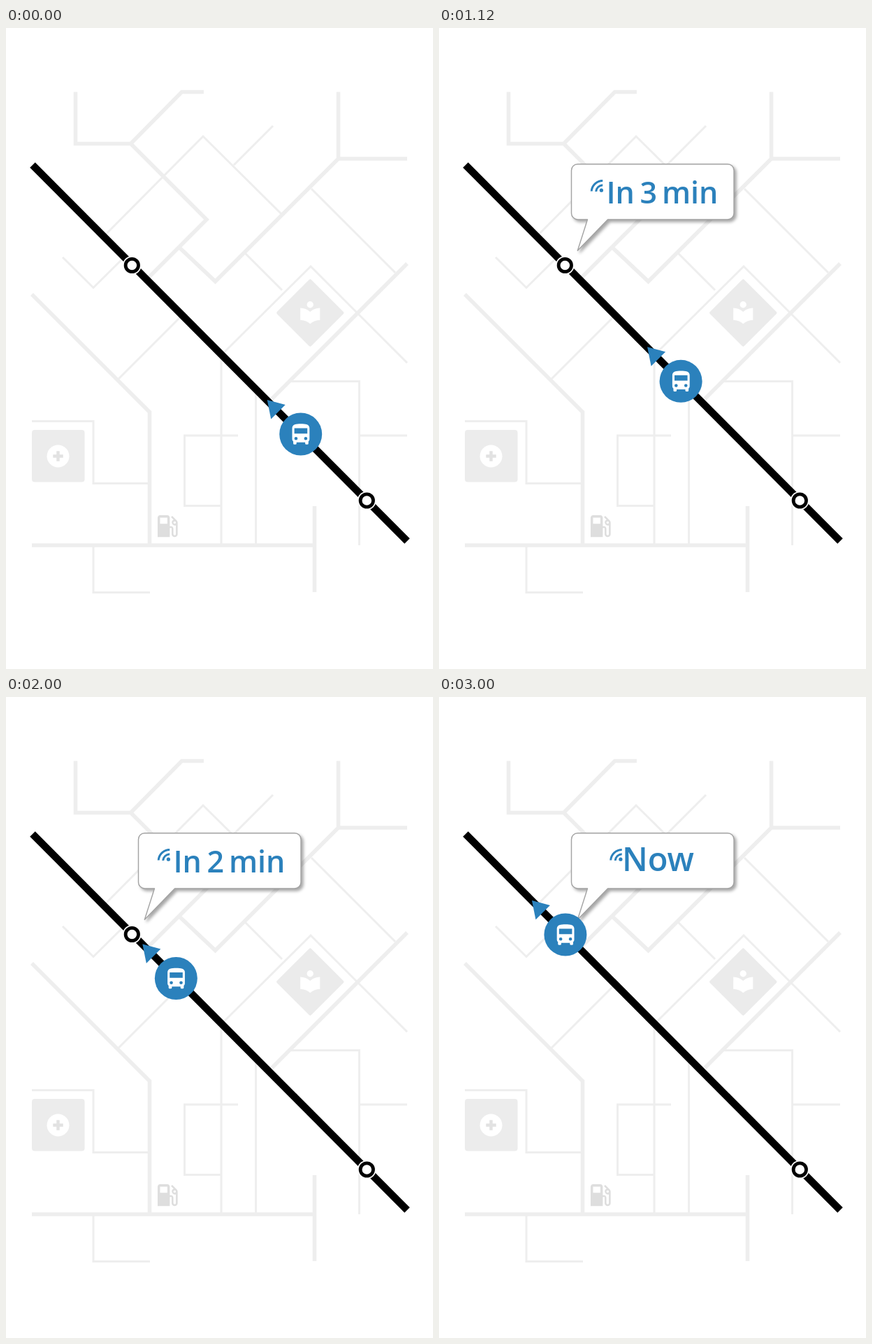
Animation of 611x917 px, one loop 4 s. Source, as an HTML page:

```html
<!DOCTYPE html>
<html lang="en">
<head>
<meta charset="utf-8">
<title>Bus arrival</title>
<style>
  html, body { margin: 0; width: 100%; height: 100%; overflow: hidden; background: #fff; }
  svg { display: block; width: 100%; height: 100%; }
  .road { fill: none; stroke: #eee; stroke-width: 3; }
  .main { stroke-width: 5.6; }
  .accent { fill: #2b81bc; }
  .balloon { fill: #fff; stroke: #a3a3a3; stroke-width: 1.4; stroke-linejoin: round;
             filter: drop-shadow(3px 3px 2px rgba(0, 0, 0, .35)); }
  text { font: 600 43px "Open Sans", "Noto Sans", sans-serif; }
  #now text { font-size: 47px; }
</style>
</head>
<body>
<svg viewBox="0 0 611 917">
  <defs>
    <g id="stop">
      <circle r="13.3" fill="#fff"/>
      <circle r="9.2" fill="#fff" stroke="#000" stroke-width="4.8"/>
    </g>
    <g id="signal" class="accent">
      <circle cx="232.4" cy="232.2" r="2.6"/>
      <path d="M218.2 233.5A16 16 0 0 1 234.2 218.5M224.7 234A10 10 0 0 1 234.2 224.7"
            fill="none" stroke="#2b81bc" stroke-width="3"/>
    </g>
  </defs>

  <path class="road" d="M140 298L282 155L394 266M326 196L382 140M81 328L125 371.5L169 328
    M437 230L557 350M342 322L395 375M308 468L436 341L574 479M161 502L252 411
    M308 466V740M357.5 518V740M406 505.5H505.5V740M505.5 583H574M332 583H255.5V683.5H308
    M37 562.5H125V651.5H205M125 740V807.5H206"/>
  <path class="road main" d="M99.5 91.5V165.5H178.5L251.5 91.5H283M178.5 165.5L287 274L202 359
    M248 314L299.5 362.5L475.5 187H574M475.5 91.5V187M37 381L205.5 549.5V740
    M37 740H441.5M441.5 684V807M574 337L380 531"/>

  <rect x="37" y="575" width="75.5" height="74.5" rx="4" fill="#ececec"/>
  <circle cx="74.5" cy="612.5" r="16" fill="#fff"/>
  <path d="M67.3 612.5h14.4M74.5 605.3v14.4" stroke="#e2e2e2" stroke-width="4.4"/>

  <rect x="-34.6" y="-34.6" width="69.2" height="69.2" rx="2" fill="#ebebeb"
        transform="translate(435.3 407.5) rotate(45)"/>
  <path fill="#fff" transform="translate(416.5 388) scale(1.56)"
    d="M12 11.55C9.64 9.35 6.48 8 3 8v11c3.48 0 6.64 1.35 9 3.55 2.36-2.19 5.52-3.55 9-3.55V8c-3.48 0-6.64 1.35-9 3.55z
    M12 8a3 3 0 0 0 0-6a3 3 0 0 0 0 6z"/>
  <path fill="#dedede" transform="translate(210 691.8) scale(1.74)"
    d="M19.77 7.23l-3.71-3.73L15 4.56l2.11 2.11A2.5 2.5 0 0 0 19 11.29v7.21a1 1 0 0 1-2 0V14c0-1.1-.9-2-2-2h-1V5
    c0-1.1-.9-2-2-2H6c-1.1 0-2 .9-2 2v16h10v-7.5h1.5v5a2.5 2.5 0 0 0 5 0V9c0-.69-.28-1.32-.73-1.77z
    M12 10H6V5h6zM18 10a1 1 0 0 1 0-2a1 1 0 0 1 0 2z"/>

  <path d="M38 196L574 734" stroke="#000" stroke-width="10.5"/>
  <use href="#stop" x="180.3" y="339.5"/>
  <use href="#stop" x="516.3" y="676"/>

  <g id="bubble">
    <path class="balloon" d="M198.5 194.7H413a9 9 0 0 1 9 9V265a9 9 0 0 1-9 9H241.5L198.3 318.5L212.5 274H198.5
      a9 9 0 0 1-9-9V203.7a9 9 0 0 1 9-9z"/>
    <g id="wait" class="accent">
      <use href="#signal"/>
      <text x="239.5" y="251">In</text>
      <text id="minutes" y="251">3</text>
      <text x="319" y="251">min</text>
    </g>
    <g id="now" class="accent">
      <use href="#signal" x="27.5"/>
      <text x="262" y="249">Now</text>
    </g>
  </g>

  <g id="bus">
    <path class="accent" d="M-48-49L-22-42L-42.5-21.5z"/>
    <circle class="accent" r="30.5"/>
    <path fill="#fff" transform="translate(-18.4 -17.8) scale(1.55)"
      d="M4 16c0 .88.39 1.67 1 2.22V20a1 1 0 0 0 1 1h1a1 1 0 0 0 1-1v-1h8v1a1 1 0 0 0 1 1h1a1 1 0 0 0 1-1v-1.78
      c.61-.55 1-1.34 1-2.22V6c0-3.5-3.58-4-8-4s-8 .5-8 4z
      M7.5 17a1.5 1.5 0 0 1 0-3a1.5 1.5 0 0 1 0 3zM16.5 17a1.5 1.5 0 0 1 0-3a1.5 1.5 0 0 1 0 3zM18 11H6V6h12z"/>
  </g>
</svg>
<script>
  const LOOP = 4000, STEP = 40, TRIP = 3000;
  const POP = 320, SETTLED = 600, PEAK = 1.095;
  const TWO = 1240, ONE = 2160, ARRIVED = 2720;
  const [bubble, wait, minutes, now, bus] =
    ["bubble", "wait", "minutes", "now", "bus"].map(id => document.getElementById(id));

  // Smoothstep progress of t between two times.
  function ease(t, from, to) {
    const p = Math.min(1, Math.max(0, (t - from) / (to - from)));
    return p * p * (3 - 2 * p);
  }

  const show = (node, visible) => node.setAttribute("visibility", visible ? "inherit" : "hidden");

  function draw(t) {
    const trip = ease(t, 0, TRIP);
    bus.setAttribute("transform", `translate(${421.7 - 240.8 * trip} ${581 - 241 * trip})`);

    // The bubble grows from the tip of its tail.
    const scale = PEAK * ease(t, 0, POP) - (PEAK - 1) * ease(t, POP, SETTLED);
    bubble.setAttribute("transform", `translate(198 319) scale(${scale}) translate(-198 -319)`);
    show(bubble, scale > 0);

    const left = t < TWO ? 3 : t < ONE ? 2 : 1;
    minutes.textContent = left;
    minutes.setAttribute("x", left === 1 ? 292.5 : 287.5);
    show(wait, t < ARRIVED);
    show(now, t >= ARRIVED);
  }

  function tick() {
    draw(Math.floor(performance.now() % LOOP / STEP) * STEP);
    requestAnimationFrame(tick);
  }
  tick();
</script>
</body>
</html>
```
